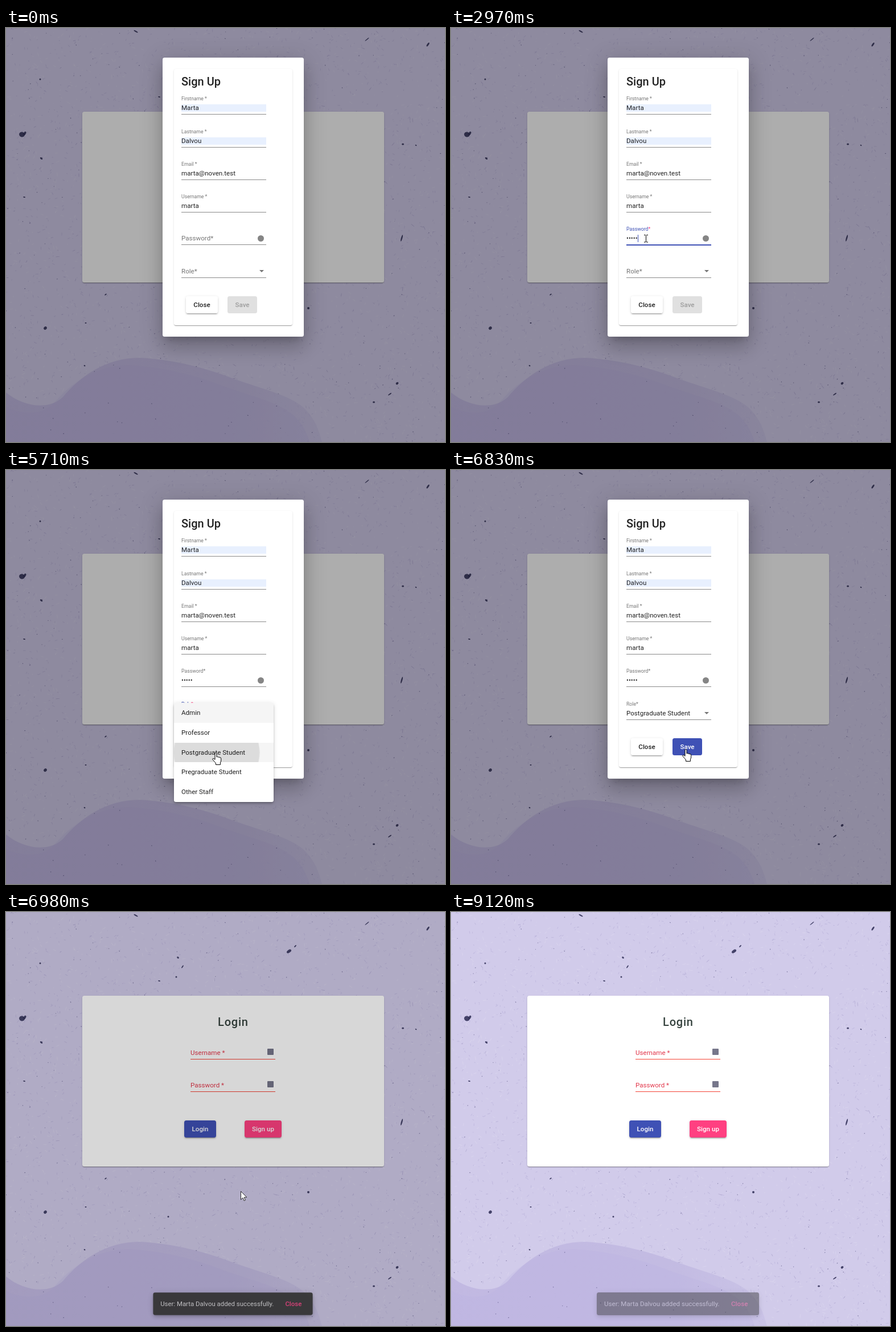
These frames come from a looping animation (771 by 727 pixels, 9200 ms). An HTML page with a canvas:

```html
<!DOCTYPE html>
<html lang="en">
<head>
<meta charset="utf-8">
<title>Sign Up</title>
<style>
:root {
  --indigo: #3f51b5;
  --pink: #ff4081;
  --hint: rgba(0, 0, 0, .54);
  --swift: cubic-bezier(.25, .8, .25, 1);
  --loop: 9.2s linear infinite;
  --step: 9.2s step-end infinite;
}
html, body { margin: 0; width: 100%; height: 100%; overflow: hidden; }
body { position: relative; font: 400 11.6px/20px Roboto, sans-serif; color: rgba(0, 0, 0, .87); }
body *, canvas { position: absolute; box-sizing: border-box; white-space: nowrap; }
span span, .btn span { position: static; }

.card {
  background: #fff; border-radius: 3.5px;
  box-shadow: 0 2px 1px -1px rgba(0,0,0,.2), 0 1px 1px rgba(0,0,0,.14), 0 1px 3px rgba(0,0,0,.12);
}
.title { font: 500 20px/24px Roboto, sans-serif; }
.btn {
  display: flex; align-items: center; justify-content: center;
  height: 30px; border-radius: 3.5px; font-weight: 500; background: #fff;
  box-shadow: 0 3px 1px -2px rgba(0,0,0,.2), 0 2px 2px rgba(0,0,0,.14), 0 1px 5px rgba(0,0,0,.12);
}

.field { left: 33px; width: 149px; height: 41px; border-bottom: 1px solid rgba(0,0,0,.46); }
.field label, .value { left: 0; top: 18.5px; height: 20px; }
.field label { color: var(--hint); transform-origin: 0 50%; }
.field .up { transform: translateY(-16.5px) scale(.75); }
.fill { left: 0; top: 23px; width: 149px; height: 13px; background: #e8f0fe; }
.focus { left: 0; bottom: -2px; width: 149px; height: 2px; background: var(--indigo); opacity: 0; }
.warn { left: 190px; border-color: #f44336; }
.warn label { color: #e2364a; }
.square { left: 135px; top: 22px; width: 11px; height: 11px; border-radius: 1px; background: #77778b; }
.dot { left: 134px; top: 24px; width: 11px; height: 11px; border-radius: 50%; background: #858585; }
.arrow { left: 136.5px; top: 26.5px; border: 4.2px solid transparent; border-top-color: var(--hint); }

#backdrop { inset: 0; background: rgba(0,0,0,.32); animation: backdrop var(--loop); }
@keyframes backdrop {
  0%, 74.57% { opacity: 1; animation-timing-function: var(--swift); }
  78.92%, 100% { opacity: 0; }
}
#dialog {
  left: 275px; top: 52px; width: 248px; height: 490px; background: #fff; border-radius: 3.5px;
  box-shadow: 0 9px 13px -6px rgba(0,0,0,.2), 0 20px 32px 2px rgba(0,0,0,.14), 0 7px 38px 7px rgba(0,0,0,.12);
  animation: dialog var(--loop);
}
@keyframes dialog {
  0%, 74.52% { opacity: 1; animation-timing-function: cubic-bezier(.4, 0, .2, 1); }
  75.33%, 100% { opacity: 0; }
}

/* Password field */
#pw label { animation: pwFloat var(--loop), pwColor var(--step); }
#pw label span { animation: pwStar var(--step); }
#pw .focus { animation: pwLine var(--loop); }
@keyframes pwFloat {
  0%, 9.35% { transform: none; animation-timing-function: var(--swift); }
  13.7%, 100% { transform: translateY(-16.5px) scale(.75); }
}
@keyframes pwColor { 0%, 48.91% { color: var(--hint); } 9.35% { color: var(--indigo); } }
@keyframes pwStar { 0%, 48.91% { color: var(--hint); } 9.35% { color: var(--pink); } }
@keyframes pwLine {
  0%, 9.34% { opacity: 0; transform: scaleX(.5); }
  9.35% { opacity: 1; transform: scaleX(.5); animation-timing-function: var(--swift); }
  12.61%, 48.9% { opacity: 1; transform: none; }
  48.91%, 100% { opacity: 0; }
}
#dots {
  left: 0; top: 22.5px; height: 13px; line-height: 13px; overflow: hidden; box-sizing: content-box;
  border-right: 1px solid transparent;
  animation: type var(--step), caret var(--step);
}
#dots span { position: static; display: block; }
@keyframes type {
  0% { width: 0; } 20.43% { width: 3.9px; } 22.93% { width: 7.8px; }
  28.7% { width: 11.7px; } 31.3% { width: 15.6px; } 32.28%, 100% { width: 19.6px; }
}
@keyframes caret {
  0%, 14.46%, 27.83%, 38.15%, 48.91% { border-color: transparent; }
  9.35%, 20.43%, 28.7%, 43.59% { border-color: var(--indigo); }
}
#popup {
  left: 307px; top: 377px; width: 309px; height: 48px; background: #fff; border-radius: 3px;
  font: 500 11.4px/48px "Noto Sans", "Open Sans", sans-serif; color: #202124;
  box-shadow: 0 1px 4px rgba(0,0,0,.45);
  animation: popup var(--loop);
}
#popup i { left: 11px; top: 16px; width: 15px; height: 15px; border-radius: 50%; background: #4285f4; }
#popup span { left: 37px; }
@keyframes popup {
  0%, 10.1% { opacity: 0; }
  10.11%, 21.2% { opacity: 1; }
  22.83%, 100% { opacity: 0; }
}

/* Role field and its list */
#role label { animation: roleFloat var(--loop), roleColor var(--step); }
#role label span { animation: roleStar var(--step); }
#role .focus { animation: roleLine var(--loop); }
#role .value { animation: picked var(--step); }
@keyframes roleFloat {
  0%, 48.91% { transform: none; animation-timing-function: var(--swift); }
  53.26%, 100% { transform: translateY(-16.5px) scale(.75); }
}
@keyframes roleColor { 0%, 73.48% { color: var(--hint); } 48.91% { color: var(--indigo); } }
@keyframes roleStar { 0%, 73.48% { color: var(--hint); } 48.91% { color: var(--pink); } }
@keyframes roleLine {
  0%, 48.9% { opacity: 0; transform: scaleX(.5); }
  48.91% { opacity: 1; transform: scaleX(.5); animation-timing-function: var(--swift); }
  52.17%, 73.47% { opacity: 1; transform: none; }
  73.48%, 100% { opacity: 0; }
}
@keyframes picked { 0% { opacity: 0; } 62.83%, 100% { opacity: 1; } }
#list {
  left: 295px; top: 409px; width: 175px; height: 174px; background: #fff; border-radius: 3.5px;
  overflow: hidden; transform-origin: 50% 10%;
  box-shadow: 0 2px 3px -1px rgba(0,0,0,.2), 0 3px 4px rgba(0,0,0,.14), 0 1px 8px rgba(0,0,0,.12);
  animation: list var(--loop);
}
@keyframes list {
  0%, 50.33% { opacity: 0; transform: scaleY(.8); animation-timing-function: cubic-bezier(0, 0, .2, 1); }
  51.63%, 62.83% { opacity: 1; transform: none; }
  63.91%, 100% { opacity: 0; transform: none; }
}
.option { left: 0; width: 175px; height: 34.8px; line-height: 34.8px; padding-left: 13px; overflow: hidden; }
.option:nth-child(1) { background: rgba(0,0,0,.04); }
.option:nth-child(2) { top: 34.8px; animation: hoverB var(--step); }
.option:nth-child(3) { top: 69.6px; animation: hoverC var(--step); }
.option:nth-child(4) { top: 104.4px; }
.option:nth-child(5) { top: 139.2px; }
@keyframes hoverB { 0%, 55.2% { background: none; } 52.4% { background: rgba(0,0,0,.04); } }
@keyframes hoverC { 0% { background: none; } 55.2%, 100% { background: rgba(0,0,0,.04); } }
#ripple {
  left: -27px; top: -85px; width: 204px; height: 204px; border-radius: 50%;
  background: rgba(0,0,0,.1); animation: ripple var(--loop);
}
@keyframes ripple {
  0%, 60.2% { transform: scale(0); animation-timing-function: cubic-bezier(0, 0, .2, 1); }
  65.1%, 100% { transform: none; }
}
#save { left: 114px; top: 419px; width: 52px; animation: save var(--step); }
@keyframes save {
  0% { background: #e0e0e0; color: rgba(0,0,0,.3); box-shadow: none; }
  62.83%, 100% { background: var(--indigo); color: #fff; }
}

#snack {
  left: 256px; top: 668px; width: 285px; height: 40px; line-height: 40px; border-radius: 3.5px;
  background: #323232; color: rgba(255,255,255,.7);
  box-shadow: 0 2px 4px -1px rgba(0,0,0,.2), 0 4px 8px rgba(0,0,0,.14), 0 1px 14px rgba(0,0,0,.12);
  animation: snack var(--loop);
}
#snack span { left: 13px; }
#snack b { left: 236px; font-weight: 500; color: #dd3b74; }
@keyframes snack {
  0%, 74.85% { opacity: 0; transform: scale(.8); }
  74.86% { opacity: .25; transform: scale(.8); animation-timing-function: cubic-bezier(0, 0, .2, 1); }
  76.49%, 99.07% { opacity: 1; transform: none; }
  99.08%, 100% { opacity: .46; transform: none; }
}

#cursor { left: 0; top: 0; animation: move var(--loop), onstage var(--step); }
#cursor svg { overflow: visible; width: 18px; height: 22px; fill: #fff; stroke: #000; }
#arrow { animation: arrow var(--step); }
#beam { left: -3.5px; top: -6px; animation: beam var(--step); }
#hand { left: -6px; animation: hand var(--step); }
@keyframes move {
  0%, .76% { transform: translate(658px, 694px); animation-timing-function: cubic-bezier(.3, .2, .4, 1); }
  8.48%, 39.57% { transform: translate(342px, 369px); animation-timing-function: ease-in-out; }
  44.02% { transform: translate(302px, 509px); animation-timing-function: ease-in-out; }
  48.26%, 50.43% { transform: translate(361px, 425px); animation-timing-function: ease-in-out; }
  57.07%, 64.13% { transform: translate(368px, 496px); animation-timing-function: ease-in-out; }
  69.24% { transform: translate(412px, 499px); }
  70.76%, 76.09% { transform: translate(412px, 490px); animation-timing-function: ease-in-out; }
  81.3%, 82.61% { transform: translate(361px, 678px); }
  85.11% { transform: translate(325px, 700px); animation-timing-function: ease-in; }
  92.39%, 100% { transform: translate(775px, 702px); }
}
@keyframes onstage { 0%, 92.39% { opacity: 0; } .65% { opacity: 1; } }
@keyframes arrow { 0%, 40.43%, 65.22%, 75.65% { opacity: 1; } 7.83%, 47.83%, 67.93% { opacity: 0; } }
@keyframes beam { 0%, 40.43% { opacity: 0; } 7.83% { opacity: 1; } }
@keyframes hand { 0%, 65.22%, 75.65% { opacity: 0; } 47.83%, 67.93% { opacity: 1; } }
</style>
</head>
<body>
<canvas id="paper" width="771" height="727" style="left:0;top:0"></canvas>

<div class="card" style="left:134px;top:147px;width:529.5px;height:300px">
  <div class="title" style="left:238px;top:34px;letter-spacing:.8px;color:#36433f">Login</div>
  <div class="field warn" style="top:71px"><label>Username *</label><i class="square"></i></div>
  <div class="field warn" style="top:128px"><label>Password *</label><i class="square"></i></div>
  <div class="btn" style="left:179px;top:219px;width:56px;background:#3f51b5;color:#fff">Login</div>
  <div class="btn" style="left:285px;top:219px;width:65px;background:#ff4081;color:#fff">Sign up</div>
</div>

<div id="backdrop"></div>

<div id="dialog">
  <div class="card" style="left:20px;top:20px;width:208px;height:450px"></div>
  <div class="title" style="left:33px;top:30px">Sign Up</div>
  <div class="field" style="top:59px"><i class="fill"></i><label class="up">Firstname *</label><div class="value">Marta</div></div>
  <div class="field" style="top:117px"><i class="fill"></i><label class="up">Lastname *</label><div class="value">Dalvou</div></div>
  <div class="field" style="top:174px"><label class="up">Email *</label><div class="value">marta@noven.test</div></div>
  <div class="field" style="top:231px"><label class="up">Username *</label><div class="value">marta</div></div>
  <div class="field" id="pw" style="top:288px">
    <label>Password <span>*</span></label>
    <div id="dots"><span>•••••</span></div>
    <i class="dot"></i><i class="focus"></i>
  </div>
  <div class="field" id="role" style="top:346px">
    <label>Role <span>*</span></label>
    <div class="value">Postgraduate Student</div>
    <i class="arrow"></i><i class="focus"></i>
  </div>
  <div class="btn" style="left:41px;top:419px;width:56px">Close</div>
  <div class="btn" id="save">Save</div>
</div>

<div id="popup"><i></i><span>Use passwords saved in your Cubelo Account</span></div>

<div id="list">
  <div class="option">Admin</div>
  <div class="option">Professor</div>
  <div class="option"><i id="ripple"></i>Postgraduate Student</div>
  <div class="option">Pregraduate Student</div>
  <div class="option">Other Staff</div>
</div>

<div id="snack"><span>User: Marta Dalvou added successfully.</span><b>Close</b></div>

<div id="cursor">
  <svg id="arrow"><path stroke-width=".8" d="M.5 .5V15L4 11.8L6.2 17L8.4 16L6.2 11H10.8Z"/></svg>
  <svg id="beam"><path fill="none" d="M0 .5H2.5L3.5 1.5L4.5 .5H7M3.5 1.5V12M0 13H2.5L3.5 12L4.5 13H7"/></svg>
  <svg id="hand"><path d="M5 2Q5 .5 6.5 .5T8 2V8q1.4-1.4 2.6.3q1.5-1 2.5.6q2.4-.8 2.6 1.6V14q0 2-1.3 4V21.5H6.5V19Q5 17 1 12.5q-.8-1.5.8-2q1.4 0 3.2 2Z"/></svg>
</div>

<script>
const W = 771, H = 727;
const ctx = document.getElementById('paper').getContext('2d');

let seed = 41;
function rand() {
  seed = (seed * 1664525 + 1013904223) % 4294967296;
  return seed / 4294967296;
}

function fleck(x, y, w, h, angle, color) {
  ctx.fillStyle = color;
  ctx.beginPath();
  ctx.ellipse(x, y, w / 2, h / 2, angle, 0, 7);
  ctx.fill();
}

function scatter(count, length, thickness, color) {
  for (let i = 0; i < count; i++) {
    fleck(rand() * W, rand() * H, 1 + rand() * length, thickness, rand() * 3.2, color);
  }
}

function hill(dx, dy, color) {
  ctx.save();
  ctx.translate(dx, dy);
  ctx.fillStyle = color;
  ctx.beginPath();
  ctx.moveTo(-90, 560);
  ctx.lineTo(0, 640);
  ctx.bezierCurveTo(30, 665, 75, 672, 100, 648);
  ctx.bezierCurveTo(130, 612, 175, 579, 235, 579);
  ctx.bezierCurveTo(300, 583, 350, 597, 400, 616);
  ctx.bezierCurveTo(450, 634, 505, 646, 528, 672);
  ctx.bezierCurveTo(546, 692, 551, 710, 558, 740);
  ctx.lineTo(-90, 740);
  ctx.fill();
  ctx.restore();
}

ctx.fillStyle = '#d1cbea';
ctx.fillRect(0, 0, W, H);
scatter(1800, 7, 1.4, 'rgba(255,255,255,.14)');
scatter(2200, 5, 1.1, 'rgba(110,98,165,.16)');
scatter(260, 7, .8, 'rgba(90,80,145,.28)');

const shade = ctx.createLinearGradient(0, 0, 570, 0);
shade.addColorStop(0, 'rgba(192,183,225,.92)');
shade.addColorStop(.7, 'rgba(193,185,225,.88)');
shade.addColorStop(1, 'rgba(198,191,229,.6)');
hill(0, 0, shade);
hill(-18, 13, 'rgba(184,174,222,.22)');

scatter(230, 1.2, 1.3, 'rgba(60,55,105,.5)');

// x, y, length, thickness, angle
[
  [228, 6, 8, 2, .5], [634, 20, 9, 1.5, -.7], [741, 29, 8, 3, -1],
  [60, 90, 3, 3, 0], [497, 69, 9, 5, -.6], [508, 60, 5, 2, -.8],
  [302, 80, 4, 3, .6], [310, 96, 6, 2, -1], [299, 114, 3, 3, 0],
  [269, 121, 4, 2, .2], [28, 187, 10, 9, .3], [33, 185, 4, 7, .5],
  [62, 229, 5, 3, .6], [32, 297, 4, 2, .2], [697, 204, 4, 3, 0],
  [720, 206, 3, 2, .6], [695, 369, 12, 2.5, -1.3], [531, 492, 4, 4, 0],
  [69, 527, 6, 5, -.7], [140, 518, 3, 2, 0], [285, 535, 3, 3, 0],
  [175, 468, 4, 2, -.6], [138, 593, 3, 2, .5], [687, 624, 5, 4, -.6],
  [674, 643, 7, 2, -.6], [646, 657, 4, 3, 0]
].forEach(([x, y, w, h, angle]) => fleck(x, y, w, h, angle, 'rgba(44,42,82,.85)'));
</script>
</body>
</html>
```
